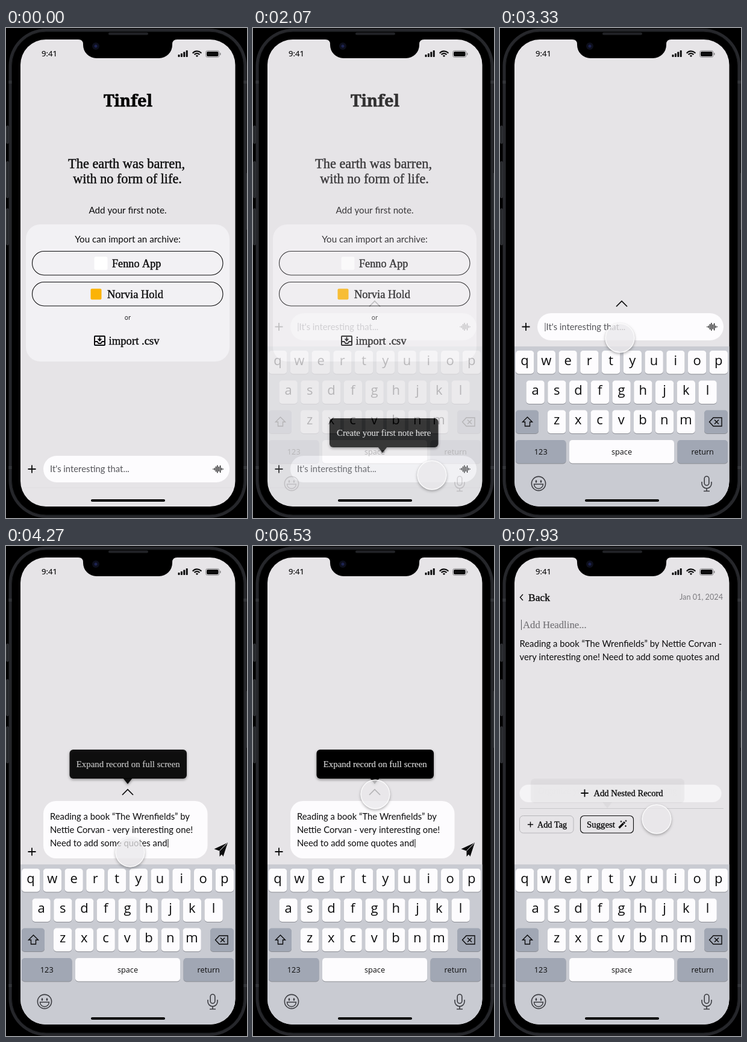
An HTML page with a canvas that plays this animation: 400x811 px, repeating every 8000 ms.

```html
<!DOCTYPE html>
<html lang="en">
<head>
<meta charset="utf-8">
<title>Note app walkthrough</title>
<style>
html, body { margin: 0; width: 100%; height: 100%; overflow: hidden; background: #000; }
canvas { display: block; width: 400px; height: 811px; }
</style>
</head>
<body>
<canvas id="stage"></canvas>
<script>
const W = 400, H = 811, LOOP = 8000;
const scale = window.devicePixelRatio || 1;
const BG = '#e6e4e7', INK = '#0b0b0c', WHITE = '#fdfcfe';
const serif = size => `${size}px "Liberation Serif", serif`;
const lato = size => `${size}px Lato, sans-serif`;
const sans = size => `${size}px "Open Sans", sans-serif`;

function setup(canvas) {
  canvas.width = W * scale;
  canvas.height = H * scale;
  const g = canvas.getContext('2d');
  g.scale(scale, scale);
  return g;
}
const stage = setup(document.getElementById('stage'));
const buffer = document.createElement('canvas');
const layer = setup(buffer);
let c = stage;

// Drawing helpers
function box(x, y, w, h, r, fill, stroke, lw = 1) {
  c.beginPath();
  c.roundRect(x, y, w, h, r);
  if (fill) { c.fillStyle = fill; c.fill(); }
  if (stroke) { c.strokeStyle = stroke; c.lineWidth = lw; c.stroke(); }
}
function path(points, { fill, stroke = INK, lw = 1.5, close = false } = {}) {
  c.beginPath();
  points.forEach(([x, y]) => c.lineTo(x, y));
  if (close) c.closePath();
  if (fill) { c.fillStyle = fill; c.fill(); return; }
  c.strokeStyle = stroke;
  c.lineWidth = lw;
  c.stroke();
}
function arc(x, y, r, from, to, lw, color = INK) {
  c.beginPath();
  c.arc(x, y, r, from, to);
  c.strokeStyle = color;
  c.lineWidth = lw;
  c.stroke();
}
function text(s, x, y, font, color = INK, align = 'left', weight = 0) {
  c.font = font;
  c.textAlign = align;
  c.fillStyle = color;
  c.fillText(s, x, y);
  if (weight) {
    c.strokeStyle = color;
    c.lineWidth = weight;
    c.strokeText(s, x, y);
  }
}
function plus(x, y, r, lw) {
  path([[x - r, y], [x + r, y]], { lw });
  path([[x, y - r], [x, y + r]], { lw });
}
function withShadow(color, blur, dy, draw) {
  c.save();
  c.shadowColor = color;
  c.shadowBlur = blur * scale;
  c.shadowOffsetY = dy * scale;
  draw();
  c.restore();
}
function fade(alpha, draw) {
  if (alpha <= 0) return;
  c.save();
  c.globalAlpha = alpha;
  draw();
  c.restore();
}

// Timing helpers
const clamp = v => Math.max(0, Math.min(1, v));
const span = (t, a, b) => clamp((t - a) / (b - a));
const easeInOut = p => p * p * (3 - 2 * p);

// Phone
function phone() {
  c.fillStyle = '#000';
  c.fillRect(0, 0, W, H);
  box(4.5, 1, 395, 810, 62, '#26272b');
  box(9.5, 6, 385, 800, 57, '#000', '#17181a', 1);
  for (const [y, h] of [[162, 29], [221, 60], [299, 60]])
    box(0.5, y, 4, h, 1.5, '#26282b', '#3a3c40', 0.8);
  box(398, 240, 3, 94, 1, '#2d2f33');
  for (const y of [87, 725]) {
    box(4.5, y, 5, 5, 0, '#34363a');
    box(394.5, y, 5, 5, 0, '#34363a');
  }
  box(170, 7.5, 66, 4, 2, '#222327');
}
function notch() {
  c.beginPath();
  c.moveTo(120, 18);
  c.lineTo(120, 19);
  c.quadraticCurveTo(128, 19, 128, 27);
  c.lineTo(128, 28);
  c.arcTo(128, 50, 150, 50, 22);
  c.lineTo(254, 50);
  c.arcTo(276, 50, 276, 28, 22);
  c.lineTo(276, 27);
  c.quadraticCurveTo(276, 19, 284, 19);
  c.lineTo(284, 18);
  c.fillStyle = '#000';
  c.fill();
  box(143, 24, 12, 12, 6, '#0d0f1c');
  box(146.5, 27.5, 5, 5, 2.5, '#1d2350');
}
function statusBar() {
  text('9:41', 59, 47, sans(13.2), INK, 'left', 0.2);
  [4, 6, 8.5, 11].forEach((h, i) => box(285.5 + i * 4.4, 48 - h, 3, h, 0.8, INK));
  const a = -Math.PI * 0.77, b = -Math.PI * 0.23;
  arc(317, 48, 9.6, a, b, 2.2);
  arc(317, 48, 5.9, a, b, 2.2);
  arc(317, 48, 1.5, a, b, 3);
  box(331.5, 37.5, 22.5, 11, 3.2, null, '#88878a', 1);
  box(333, 39, 19.5, 8, 2, INK);
  box(355, 41, 1.5, 4, 0.7, '#88878a');
}
function homeBar() {
  box(141, 780, 123, 4, 2, '#000');
}

// Shared parts
function tooltip(x, y, w, h, tip, label) {
  withShadow('rgba(0,0,0,.4)', 4, 2, () => {
    path([[tip - 8, y + h - 1], [tip + 8, y + h - 1], [tip, y + h + 9]], { fill: '#000' });
    box(x, y, w, h, 6, '#000');
  });
  text(label, x + w / 2, y + h / 2 + 5, serif(14.9), '#dcdcdc', 'center', 0.15);
}
function waveform(x, y) {
  [1.5, 4, 9, 13, 8, 12, 4, 1.5].forEach((h, i) =>
    box(x - 8.8 + i * 2.35, y - h / 2, 1.3, h, 0.6, INK));
}
function field(y, h) {
  plus(43, y + h / 2, 6.5, 1.8);
  box(62, y, 309, h, h / 2, WHITE);
  waveform(352, y + h / 2);
}
const chevronUp = y => path([[193, y + 9], [202, y], [211, y + 9]], { lw: 1.7 });

function key(x, y, w, fill = WHITE) {
  box(x, y + 1, w, 38.5, 5, '#8b8d94');
  box(x, y, w, 38.5, 5, fill);
}
function keyboard() {
  const dark = '#a1a7b4', grey = '#3c3d42';
  c.fillStyle = '#c9cbd2';
  c.fillRect(24, 527, 357, 266);
  [['qwertyuiop', 26, 534], ['asdfghjkl', 43.5, 583.5], ['zxcvbnm', 79, 632.5]].forEach(([row, x, y]) =>
    [...row].forEach((ch, i) => {
      const kx = x + i * 35.75;
      key(kx, y, 30.3);
      text(ch, kx + 15.1, y + 23.7, sans(22), INK, 'center');
    }));
  key(26, 632.5, 38, dark);
  key(339, 632.5, 39, dark);
  [['123', 26, 83.5, dark], ['space', 115, 174, WHITE], ['return', 294.5, 83.5, dark]].forEach(([s, x, w, fill]) => {
    key(x, 682, w, fill);
    text(s, x + w / 2, 706, sans(12.7), INK, 'center');
  });
  path([[45.5, 644], [53.5, 652], [49.5, 652], [49.5, 659], [41.5, 659], [41.5, 652], [37.5, 652]],
    { close: true, lw: 1.4 });
  path([[347.5, 652], [354, 645], [368, 645], [368, 659], [354, 659]], { close: true, lw: 1.4 });
  path([[356, 648.5], [363, 655.5]], { lw: 1.4 });
  path([[363, 648.5], [356, 655.5]], { lw: 1.4 });

  arc(64, 754, 11.6, 0, Math.PI * 2, 1.6, grey);
  for (const x of [60, 68]) {
    c.beginPath();
    c.ellipse(x, 750.5, 1.3, 2.2, 0, 0, Math.PI * 2);
    c.fillStyle = grey;
    c.fill();
  }
  c.beginPath();
  c.arc(64, 755, 7.5, 0, Math.PI);
  c.closePath();
  c.lineWidth = 1.5;
  c.stroke();

  box(339.2, 742, 7.6, 15, 3.8, null, grey, 1.6);
  c.beginPath();
  c.moveTo(335, 751);
  c.lineTo(335, 754);
  c.arc(343, 754, 8, Math.PI, 0, true);
  c.lineTo(351, 751);
  c.stroke();
  path([[343, 762], [343, 766.5]], { stroke: grey, lw: 1.6 });
  path([[338, 766.5], [348, 766.5]], { stroke: grey, lw: 1.6 });
}

function base() {
  c.fillStyle = BG;
  c.fillRect(20, 15, 364, 782);
}

// Screens
function home(t) {
  base();
  text('Tinfel', 202.5, 129.5, '900 27px "Noto Serif", serif', '#000', 'center', 0.6);
  text('The earth was barren,', 200, 232, serif(22.4), INK, 'center', 0.4);
  text('with no form of life.', 201.5, 257, serif(22.2), INK, 'center', 0.4);
  text('Add your first note.', 202, 307, lato(15.2), INK, 'center');
  box(33, 325, 338, 227, 24, '#f2f1f4');
  text('You can import an archive:', 202, 354.5, lato(15.2), INK, 'center');
  box(43.5, 369.5, 316.5, 39.5, 19.7, null, INK, 1.1);
  box(43.5, 420.5, 316.5, 39.5, 19.7, null, INK, 1.1);
  box(146.5, 378.5, 22, 22, 3, '#fff');
  text('Fenno App', 176, 396, serif(18.2), INK, 'left', 0.4);
  box(140.5, 431.5, 18, 18, 2, '#fbb306');
  text('Norvia Hold', 168, 447, serif(18.5), INK, 'left', 0.4);
  text('or', 202, 482.5, sans(10.2), INK, 'center');

  box(147, 510, 17, 15, 1, null, INK, 2);
  path([[147, 519], [151.5, 519], [153.5, 522], [157.5, 522], [159.5, 519], [164, 519]], { lw: 1.8 });
  path([[155.5, 511.5], [155.5, 517]], { lw: 2 });
  path([[151.5, 514.5], [159.5, 514.5], [155.5, 519]], { fill: INK });
  text('import .csv', 170.5, 524, serif(18.7), INK, 'left', 0.4);

  path([[24, 761], [380, 761]], { stroke: 'rgba(0,0,0,.025)', lw: 1 });
  field(708, 44);
  text("It's interesting that...", 73, 735.3, lato(14.8), '#55555a');
  fade(span(t, 70, 370), () => tooltip(127, 646, 180.5, 48, 215, 'Create your first note here'));
}
function emptyNote() {
  base();
  chevronUp(452);
  field(472, 45);
  path([[75, 488], [75, 502]], { stroke: '#55555a', lw: 1 });
  text("It's interesting that...", 76.5, 499.5, lato(14.8), '#55555a');
  keyboard();
}
function typedNote(t) {
  base();
  chevronUp(403);
  plus(43, 506, 6.5, 1.8);
  box(62, 422, 272.5, 95, 21, WHITE);
  const last = 'Need to add some quotes and';
  ['Reading a book “The Wrenfields” by', 'Nettie Corvan - very interesting one!', last]
    .forEach((s, i) => text(s, 73, 453 + i * 22, lato(14.8)));
  const caret = 74.5 + c.measureText(last).width;
  path([[caret, 485], [caret, 499]], { lw: 1 });
  path([[368, 491], [345.5, 501.5], [354, 504.5], [360.5, 514]], { fill: INK });
  path([[367, 492], [354.5, 504.5]], { stroke: BG, lw: 1 });
  path([[354.5, 505], [354.5, 514], [358.5, 510]], { fill: INK });
  keyboard();
  fade(span(t, 4000, 4300), () => tooltip(105.5, 337, 194.5, 48, 202, 'Expand record on full screen'));
}
function fullNote(t) {
  base();
  path([[38, 80], [33.5, 85], [38, 90]], { lw: 1.4 });
  text('Back', 47, 90.5, serif(17.6), INK, 'left', 0.4);
  text('Jan 01, 2024', 370, 89, lato(12.7), '#7d7c80', 'right');
  path([[35.5, 122], [35.5, 139]], { stroke: '#55555a', lw: 1 });
  text('Add Headline...', 38, 136, serif(16.7), '#77767a', 'left', 0.2);
  text('Reading a book “The Wrenfields” by Nettie Corvan -', 32.5, 167.3, lato(14.8));
  text('very interesting one! Need to add some quotes and', 32.5, 189.3, lato(14.8));
  box(32.5, 395, 335, 29, 14.5, '#f5f4f6');
  plus(140.5, 409, 6.2, 1.8);
  text('Add Nested Record', 155.5, 414, serif(14.6), INK, 'left', 0.35);
  path([[33, 434.5], [371, 434.5]], { stroke: '#c9c8cb', lw: 1 });
  box(32.5, 446.5, 89.5, 28.5, 6, null, '#b7b6ba', 1);
  plus(50.5, 461, 4.6, 1.4);
  text('Add Tag', 62, 465.5, serif(14.2), INK, 'left', 0.35);
  box(133.5, 446.5, 88, 28.5, 6, null, INK, 1.1);
  text('Suggest', 144, 465.5, serif(14.8), INK, 'left', 0.35);
  path([[197.5, 466.5], [207, 457]], { lw: 3.2 });
  path([[204, 457.8], [206.2, 460]], { stroke: BG, lw: 0.9 });
  for (const [x, y] of [[201, 456], [208.5, 463.5], [209, 455]]) plus(x, y, 1.5, 1);
  keyboard();
  fade(span(t, 7922, 8222), () => tooltip(51, 385, 255, 40, 178, 'Organize your records by auto-tagging'));
}

const screens = [
  { draw: home, start: 0, end: 0 },
  { draw: emptyNote, start: 2000, end: 2330 },
  { draw: typedNote, start: 3590, end: 3800 },
  { draw: fullNote, start: 6580, end: 6900 },
];
function drawScreens(t) {
  const i = screens.findLastIndex(s => t >= s.start);
  const { draw, start, end } = screens[i];
  const p = end ? span(t, start, end) : 1;
  if (p === 1) { draw(t); return; }
  screens[i - 1].draw(t);
  c = layer;
  c.clearRect(0, 0, W, H);
  draw(t);
  c = stage;
  fade(p, () => c.drawImage(buffer, 0, 0, W, H));
}

// Touch pointer: time, x, y
const route = [
  [900, 428, 733], [1000, 371, 737], [1600, 299, 742], [2070, 297, 740], [2600, 297, 740],
  [3300, 199, 513], [4000, 199, 513], [4900, 231, 485], [5530, 231, 485],
  [6330, 203, 411], [6900, 203, 411], [7700, 260, 452], [8000, 260, 452],
];
function pointer(t) {
  if (t < route[0][0]) return;
  const i = Math.min(route.findLastIndex(k => t >= k[0]), route.length - 2);
  const [t0, x0, y0] = route[i], [t1, x1, y1] = route[i + 1];
  const p = easeInOut(span(t, t0, t1));
  const x = x0 + (x1 - x0) * p, y = y0 + (y1 - y0) * p;

  // The shadow stays outside the translucent disc
  c.save();
  c.beginPath();
  c.rect(0, 0, W, H);
  c.arc(x, y, 24.5, 0, Math.PI * 2);
  c.clip('evenodd');
  withShadow('rgba(0,0,0,.38)', 5, 2, () => box(x - 24, y - 24, 48, 48, 24, '#e9e8eb'));
  c.restore();
  box(x - 24.5, y - 24.5, 49, 49, 24.5, 'rgba(234,233,236,.76)');
  arc(x, y, 23.8, 0, Math.PI * 2, 1.4, 'rgba(255,255,255,.75)');
}

function frame() {
  const t = performance.now() % LOOP;
  phone();
  c.save();
  c.beginPath();
  c.roundRect(24, 19, 356.5, 773, 42);
  c.clip();
  drawScreens(t);
  statusBar();
  homeBar();
  c.restore();
  notch();
  pointer(t);
  requestAnimationFrame(frame);
}
frame();
</script>
</body>
</html>
```
